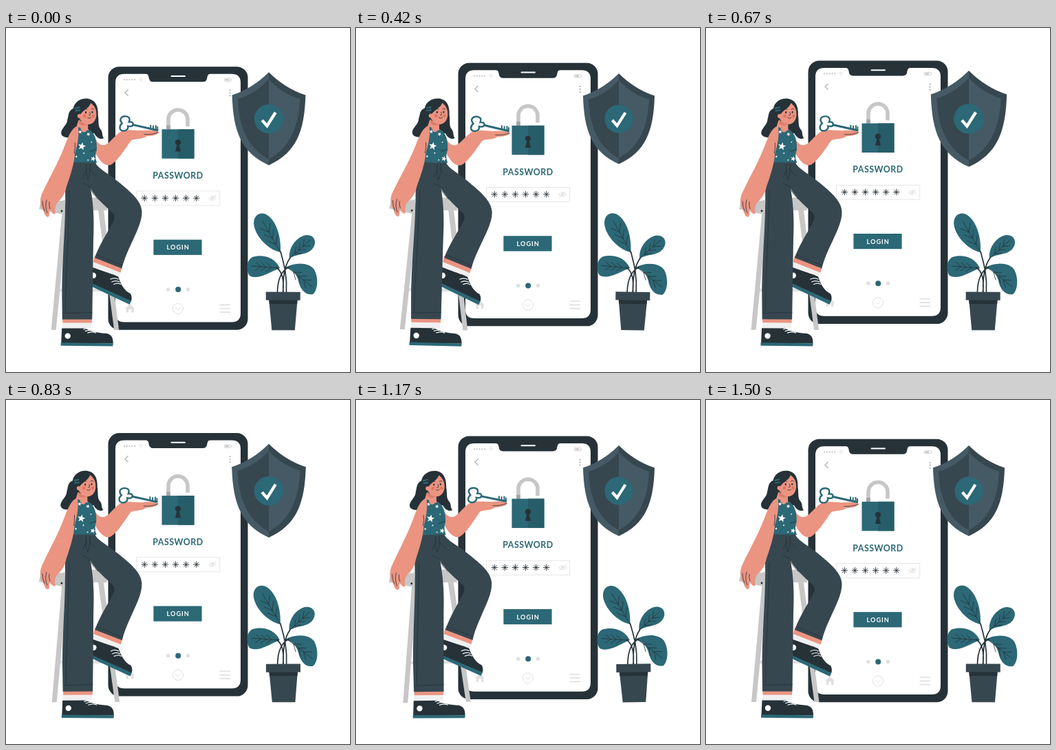
An HTML page that plays this animation: 500x500 px, repeating every 1540 ms.

```html
<!DOCTYPE html>
<html lang="en">
<head>
<meta charset="utf-8">
<title>Password login</title>
<style>
  html, body { margin: 0; width: 100%; height: 100%; overflow: hidden; background: #fff; }
  svg { display: block; width: 100vw; height: 100vh; }
  text { font-family: Lato, "Open Sans", sans-serif; font-weight: 700; text-anchor: middle; }
  .teal { fill: #2c6876; } .ink { fill: #263238; } .slate { fill: #37474f; }
  .steel { fill: #455a64; } .skin { fill: #eb9481; } .pale { fill: #e0e0e0; }
  .grey { fill: #c7c7c7; } .white { fill: #fff; }
  .line { fill: none; stroke: #263238; stroke-width: .8; stroke-linecap: round; stroke-linejoin: round; }
  .stem { stroke-width: 1.7; }
  .faint { fill: none; stroke: #e0e0e0; stroke-width: 1; stroke-linecap: round; stroke-linejoin: round; }
  .lace { fill: none; stroke: #fff; stroke-width: 1.2; stroke-linecap: round; }
</style>
</head>
<body>
<svg viewBox="0 0 500 500">
  <g id="phone">
    <rect class="ink" x="148.5" y="56.7" width="203" height="382.6" rx="16"/>
    <path class="white" d="M172 67.3H203Q207 67.3 207.5 72Q208 78.8 214 78.8H286Q292 78.8 292.5 72Q293 67.3 297 67.3H328Q341 67.3 341 80V415Q341 428 328 428H172Q159 428 159 415V80Q159 67.3 172 67.3Z"/>
    <path d="M240.5 70.5H260" fill="none" stroke="#fff" stroke-width="2" stroke-linecap="round"/>
    <g id="signal" class="grey"></g>
    <path class="faint" d="M193 75q3-3 6 0M194.5 76.5q1.5-1.5 3 0"/>
    <circle class="pale" cx="196" cy="78" r=".6"/>
    <rect x="317.4" y="73.7" width="9.6" height="4.2" rx="1" fill="none" stroke="#c7c7c7" stroke-width=".8"/>
    <path class="grey" d="M318.5 74.7h5.5v2.2h-5.500zM327.5 75h.8v1.700h-.8z"/>
    <path d="M177.5 90L173 94.5L177.5 99" fill="none" stroke="#b5b5b5" stroke-width="1.4"/>
    <g id="more" fill="#b5b5b5"></g>

    <path d="M236 148V133.500A14 14 0 0 1 264 133.500V143.500" fill="none" stroke="#c7c7c7" stroke-width="5.6"/>
    <path d="M236 142V148" fill="none" stroke="#a6a6a6" stroke-width="5.6"/>
    <rect class="teal" x="226.5" y="147.8" width="47" height="42.5"/>
    <rect x="250" y="147.8" width="23.5" height="42.5" fill="#265d69"/>
    <path class="ink" d="M248.3 170.500A4.200 4.200 0 1 1 251.700 170.500L254 180H246Z"/>

    <text class="teal" x="250" y="219.6" font-size="12.4" letter-spacing=".5">PASSWORD</text>
    <rect x="189.4" y="237.5" width="121.4" height="21" fill="none" stroke="#e0e0e0" stroke-width=".8"/>
    <g id="stars" stroke="#263238" stroke-width=".9" stroke-linecap="round"></g>
    <path class="faint" d="M295 248q5-6 10.500 0q-5.500 6-10.500 0zM296 251.500l9-7.500"/>
    <circle class="pale" cx="300.2" cy="247.8" r="1.8"/>
    <rect class="teal" x="214.4" y="308.2" width="70.2" height="22.2"/>
    <text class="white" x="250.2" y="322.8" font-size="9.2" letter-spacing="1">LOGIN</text>

    <circle class="pale" cx="235.8" cy="380.5" r="2.7"/>
    <circle class="teal" cx="250.2" cy="380.5" r="4"/>
    <circle class="pale" cx="264.6" cy="380.5" r="2.7"/>
    <path class="pale" d="M173.500 408L180 401.500L186.500 408L185.500 409V414H182V409.500H178V414H174.800V409Z"/>
    <circle class="faint" cx="250" cy="408.5" r="7.6"/>
    <path class="faint" d="M246.500 407l3.500 3.500 3.500-3.500"/>
    <path d="M310.500 403h15.500M310.500 408.300h15.500M310.500 413.600h15.500" fill="none" stroke="#e0e0e0" stroke-width="1.7"/>
  </g>

  <g id="shield">
    <path class="steel" d="M382 66Q359 89 330 98.500C331.500 150 343 180 382 197.700Z"/>
    <path class="slate" d="M382 66Q405 89 434 98.500C432.500 150 421 180 382 197.700Z"/>
    <path class="slate" d="M382 76Q364 96 338 104C340 144 352 173 382 189Z"/>
    <path class="steel" d="M382 76Q400 96 426 104C424 144 412 173 382 189Z"/>
    <circle class="teal" cx="382" cy="132" r="20.6"/>
    <path d="M372.500 134L379.500 142L391.500 123" fill="none" stroke="#fff" stroke-width="4.2"/>
  </g>

  <g id="plant">
    <g id="leaves"></g>
    <path class="line stem" d="M407.500 384C409 358 403 340 399 325M403 384C402 360 405 345 413 334M394.500 384C395 362 402 352 411 347.500M402.500 384C405 362 400 353 393 348"/>
    <path class="slate" d="M382.300 395H423.700L420 439.300H386.500Z"/>
    <path class="ink" d="M382.300 395H423.700L423.200 401H382.800Z"/>
    <rect class="slate" x="377.8" y="383.6" width="50" height="12"/>
  </g>

  <g id="woman">
    <path class="pale" d="M75 379H152V383H75Z"/>
    <path class="grey" d="M83 250H91L73 439H66ZM132 250H140L164.500 439H157.500Z"/>
    <path class="grey" d="M112 246.500H147V265H112Z"/>

    <path class="ink" d="M119 102.800C108 101.500 99 108 97.500 117C90 120 91 127 89 133C89 140 82 144 80 151C79 158 86 160 95 159C99 159 102 156 104 153L128 153C131 159 137 163 142 160C138.500 156 141 151 137 147C133 142 135 136 133.500 127C134 112 129 104.500 119 102.800Z"/>

    <path class="skin" d="M122 151C128 157 130 164 134 167C139 172 144 171 150 166C158 158 163 152 170 149C180 147 190 149 198 149C206 148 216 148 222 151C221 155 212 157 204 157C198 162 189 160 182 163C176 171 163 193 152 199C142 202 134 190 129 180Z"/>
    <path class="line" d="M201 154.500C208 155 215 154 221 151.500"/>

    <g fill="none" stroke="#2c6876" stroke-width="2.4">
      <path d="M168.500 138.500C163 132 168 127.800 174 128.300C180 129 180 133 178.500 136.500Q185 136 184.500 140Q184 144 177 142.500C178 147 174 150 169.500 149.300C164 148.500 164 142 168.500 138.500Z"/>
      <path d="M183 140.300L221 148.800" stroke-width="3"/>
      <path d="M210 146V140.500M213.700 147V141.500M217.500 147.500V141M220 148V143" stroke-width="2"/>
    </g>

    <path class="skin" d="M105 134L119 139V147L126 153L117 162L102 150V144Z"/>
    <path class="teal" d="M103 144L108 145C109 151 113 154 117 149L121 148C129 152 133 166 131.500 178C129 185 130 190 132 196H96C99 180 95 165 98 152Z"/>
    <g id="print" class="white"></g>
    <path class="line" d="M122 179Q128 179 131 176"/>

    <path class="skin" d="M107 118C112 116 119 114 123 109C129 114 131.500 119 131 127C130.500 136 124 141 118 140C111 139 106 133 105 126Z"/>
    <path d="M106 133Q111 139 118 140Q112 144 106 139Z" fill="#d97f6c"/>
    <path class="ink" d="M107 128C109 120 120 118 123 109L118 104L103 112L100 130L103 138Z"/>
    <circle class="skin" cx="106.5" cy="128" r="3"/>
    <g fill="#e27460"><circle cx="114" cy="128" r="2.4"/><circle cx="126.5" cy="128" r="2.2"/></g>
    <ellipse class="ink" cx="115.7" cy="122.7" rx="1.1" ry="1.6"/>
    <ellipse class="ink" cx="125.2" cy="122.3" rx="1.1" ry="1.6"/>
    <path class="line" d="M113 118.500q2.500-1.500 4.500-.3M123.500 118q2-1.500 4 0M121.500 122.500q1.500 3 0 4.500h-1.300M118.500 130.500q3 2.200 5-.5"/>
    <path d="M99.500 117l7.500-1.800M100 120.500l7.500-1" fill="none" stroke="#2c6876" stroke-width="2.2"/>

    <path class="ink" d="M125 347.500L163 361C167 372 172 382 181 386C184 391 183 396 181 399L125 374Z"/>
    <path class="teal" d="M125 371L182 396.500L180 401.800L125 376Z"/>
    <circle class="white" cx="127" cy="359.8" r="4.2"/>
    <path class="lace" d="M152 365q6-3 11 0M154 369q6-3 11 0M157 372.500q6-3 10 0"/>
    <path d="M128 338L167 354L164.500 361.500L126 347Z" fill="#f0f0f0"/>
    <path class="skin" d="M129 331L169 347L166.500 355.500L127 340Z"/>

    <path class="slate" d="M120 196H130C133 204 150 212 165 225C178 236 197 250 197.500 267C198 282 188 300 181 316C175 329 171 339 168.500 349.500L129 334C136 314 150 294 157 279C159 273 157 270 152 266C140 255 130 246 122 232Z"/>
    <path class="line" d="M131 329.500L169 345M121 232Q127 243 134 249"/>

    <path class="skin" d="M82.500 421H125V429H82.500Z"/>
    <path d="M82 428.500H124.500V437.500H82Z" fill="#f0f0f0"/>
    <path class="ink" d="M81.500 436.500H116C124 441.500 134 443 147 444C155 446 156 452 156 458.500H80.500Z"/>
    <path class="teal" d="M80 457.300L156.300 458.500L155.500 462.500L80 461.800Z"/>
    <circle class="white" cx="90" cy="447.7" r="4.2"/>
    <path class="lace" d="M113 438q7-2.500 13 0M115.500 440.700q7-2.500 13 0M119 443.200q7-2.500 12 0"/>
    <path class="slate" d="M92 195.500H130C132 206 126 218 123 234C128 262 128 285 127 310L125.500 423.500H82L81.500 380C82 330 87 285 86 237C87 220 88 206 92 195.500Z"/>
    <path class="line" d="M84 414.500L125.500 413.500M92 236C91 300 87 360 86.500 413M117 198Q115 212 119 221Q123 211 122 198M122 205Q127 213 131 215M119 205Q114 210 112 217M123 232Q116 227 112 226"/>

    <path class="grey" d="M51 251.500L86.500 251L83 271L48 263.500Z"/>
    <circle class="ink" cx="81" cy="266" r="1.5"/>
    <path class="skin" d="M104 142C94 146 90 159 84 174C76 195 62 220 54 237C48 248 49 259 54 265C56 271 58 276 62 274.500C64 272 62 267 64 263C66 270 70 272 72 269C70 263 72 256 76 252C82 247 86 240 88 230C94 213 99 197 100 182C104 170 107 152 104 142Z"/>
    <path class="line" d="M53 252Q53 260 56 266M59 250Q56 260 60 269M64 263Q62 258 63 253M99 182Q101 174 100 167"/>
  </g>
</svg>
<script>
  const $ = id => document.getElementById(id);
  const fill = (id, items, draw) => $(id).innerHTML = items.map(draw).join('');
  const dot = (x, y, r) => `<circle cx="${x}" cy="${y}" r="${r}"/>`;

  fill('signal', [0, 1, 2, 3, 4], i => dot(172 + i * 3.8, 75.7, 1.15));
  fill('more', [0, 1, 2], i => dot(325.6, 91 + i * 4, 1.15));
  fill('stars', [0, 1, 2, 3, 4, 5], i =>
    `<path transform="translate(${201.3 + i * 15.1} 247.8)" d="M0-4.3V4.3M-4.3 0H4.3M-3-3L3 3M3-3L-3 3"/>`);

  // Five-pointed stars on the top: x, y, radius, turn
  const star = ([x, y, r, turn]) => {
    const pts = Array.from({ length: 10 }, (_, i) => {
      const a = i * Math.PI / 5 + turn, d = i % 2 ? r * .42 : r;
      return `${x + d * Math.sin(a)},${y - d * Math.cos(a)}`;
    });
    return `<polygon points="${pts.join(' ')}"/>`;
  };
  fill('print', [[110, 172, 6, .2], [107.5, 151, 3, 0], [119.5, 154.5, 3, .5],
    [126.5, 190, 4, .3], [113, 182, 1.6, 0], [119, 192, 1.5, .4], [124, 166, 1.4, 0], [102, 187, 2, .2]], star);

  // Leaf outline with midrib from base to tip
  const leaf = ([outline, x, y, tx, ty]) => {
    const dx = tx - x, dy = ty - y;
    let veins = `M${x} ${y}L${tx} ${ty}`;
    for (const k of [.25, .45, .65]) for (const s of [-1, 1]) {
      const reach = .2, side = .15 * s;
      veins += `M${x + dx * k} ${y + dy * k}l${dx * reach - dy * side} ${dy * reach + dx * side}`;
    }
    return `<path class="teal" d="${outline}"/><path class="line" d="${veins}"/>`;
  };
  fill('leaves', [
    ['M399 326C380 322 361 301 360 284C360 270 372 266 381 273C394 283 400 305 399 326Z', 399, 326, 373, 281],
    ['M412 335C410 318 424 302 437 301C449 301 452 312 446 320C438 331 424 327 412 335Z', 412, 335, 442, 308],
    ['M398 349C390 332 372 329 358 333C349 338 349 352 354 360C366 367 383 355 398 349Z', 396, 349, 357, 346],
    ['M405 348.500C420 340 440 340 448 351C455 364 453 382 446 387C434 389 427 378 425 367C421 354 414 350 405 348.500Z', 409, 348, 445, 376]
  ], leaf);

  // Linear interpolation over [position, value] steps
  const along = (steps, p) => {
    const i = Math.max(1, steps.findIndex(s => p <= s[0]));
    const [a, u] = steps[i - 1], [b, v] = steps[i];
    return u + (v - u) * (p - a) / (b - a);
  };
  const FLOAT = [[0, 0], [.5, -10], [1, 0]];
  const SWAY = [[0, 0], [.25, 1], [.75, -1], [1, 0]];
  const BEAT = [[0, 1], [.1, 1.1], [.3, 1], [.4, 1], [.5, 1.1], [.6, 1], [1, 1]];
  const LOOP = 1540, LEAD = 40;
  const move = (id, value) => $(id).setAttribute('transform', value);

  const start = performance.now();
  function draw(now) {
    const p = (Math.max(0, now - start) + LEAD) % LOOP / LOOP;
    const angle = along(SWAY, p);
    move('phone', `translate(0 ${along(FLOAT, p)})`);
    move('shield', `translate(382 132) scale(${along(BEAT, p)}) translate(-382 -132)`);
    move('woman', `rotate(${angle} 135 283)`);
    move('plant', `rotate(${angle} 401 355)`);
    requestAnimationFrame(draw);
  }
  draw(start);
</script>
</body>
</html>
```
